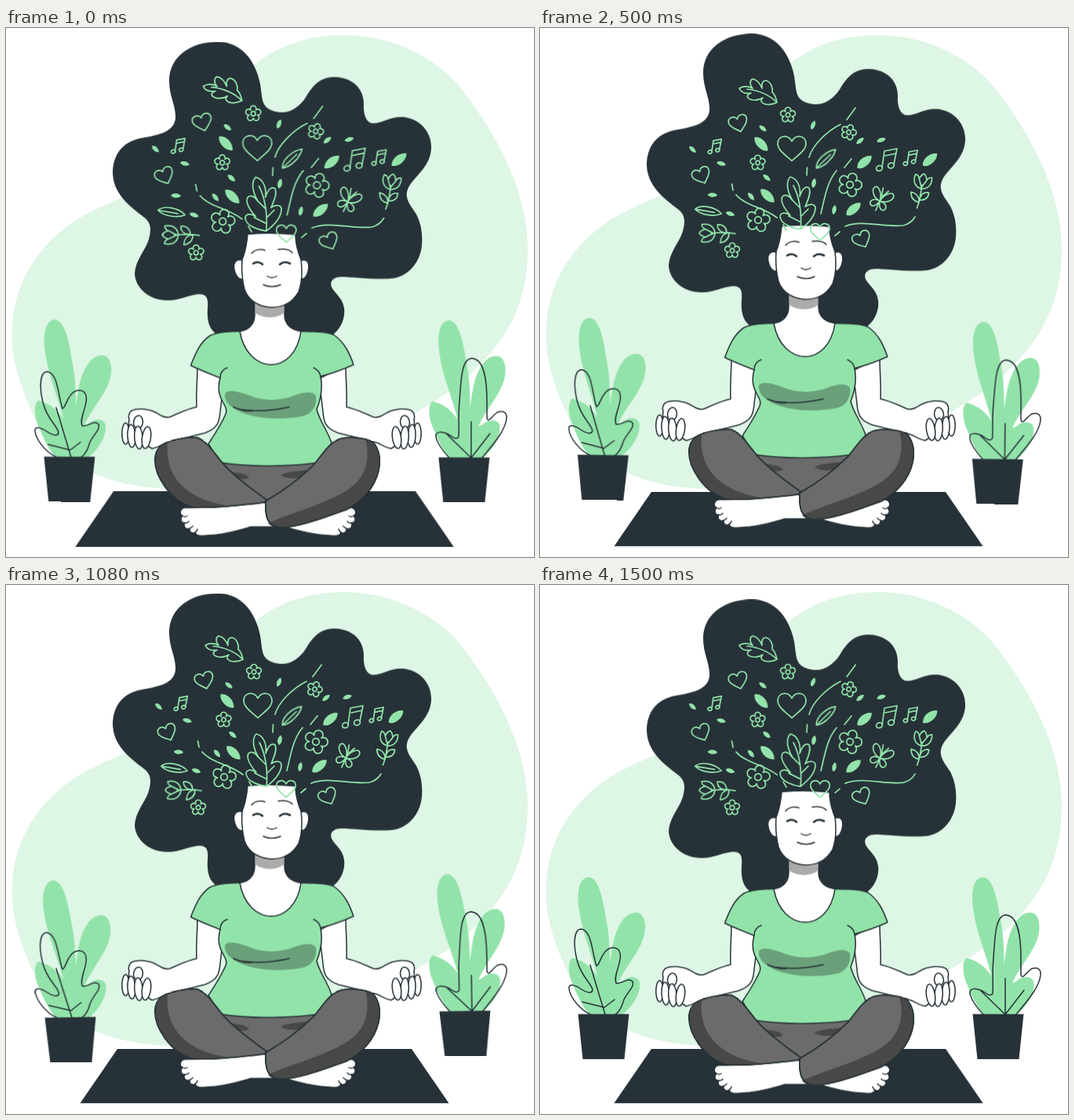
Recreate the animation shown at these times as an HTML page. Size 673 by 675 pixels, loop 1540 ms.

```html
<!DOCTYPE html>
<html lang="en">
<head>
<meta charset="utf-8">
<title>Meditation</title>
<style>
  html, body { margin: 0; width: 100%; height: 100%; overflow: hidden; background: #fff; }
  svg { display: block; width: 100vw; height: 100vh; }
  :root { --ink: #263238; --green: #92e3a9; }

  .line { fill: none; stroke: var(--ink); stroke-width: 1.5; stroke-linecap: round; stroke-linejoin: round; }
  .skin { fill: #fff; }
  .shirt { fill: var(--green); }
  .pants { fill: #6b6b6b; }
  .shade { fill: #484848; stroke: none; }
  .dark { fill: var(--ink); }
  .leafy { fill: var(--green); }
  .eyes { stroke-width: 2.6; }
  .ideas { fill: none; stroke: var(--green); stroke-width: 1.7; stroke-linecap: round; stroke-linejoin: round; }
  .drops { fill: var(--green); stroke: none; }
  .glyphs * { vector-effect: non-scaling-stroke; }

  .float, .sway, .beat { animation: 1540ms linear -40ms infinite; }
  .float { animation-name: float; animation-delay: -60ms; }
  .sway { animation-name: sway; transform-origin: 338px 488px; }
  .beat { animation-name: beat; }
  .mat { transform-origin: 329.5px 626.5px; }
  .ideas { transform-origin: 349px 178px; }

  @keyframes float { 0%, 100% { transform: translateY(.8px); } 50% { transform: translateY(-15px); } }
  @keyframes sway { 0%, 100% { transform: rotate(0deg); } 25% { transform: rotate(1deg); } 75% { transform: rotate(-1deg); } }
  @keyframes beat { 0%, 30%, 40%, 60%, 100% { transform: scale(1); } 10%, 50% { transform: scale(1.1); } }
</style>
</head>
<body>
<svg viewBox="0 0 673 675">
  <defs>
    <g id="foliage" class="leafy">
      <path d="M62 373C50 373 46 392 50 416C55 450 70 478 78 520L92 520C87 490 91 460 85 430C80 400 75 373 62 373Z"/>
      <path d="M122 418C108 418 98 435 93 458C88 485 86 510 84 530L94 522C104 488 134 465 134 437C134 425 130 418 122 418Z"/>
      <path d="M41 476C34 482 37 500 42 510C50 530 56 540 64 549H104C118 538 128 522 127 508C126 498 112 498 104 506C96 510 90 505 82 514C72 494 60 480 41 476Z"/>
    </g>
    <path id="pot" class="dark" d="M48.500 547.500H113.500L107.500 605H54.500Z"/>

    <g id="arm" class="line">
      <path class="skin" d="M244 430C244 450 242 468 243 484C232 486 218 493 208 497C197 499 192 488 180 487.500C174 486 161 486 158 491C156 494 156 497 157 500C155 510 160 525 175 530L186 537C194 536 199 531 206 529C222 524 240 521 254 517C270 511 272 503 273 490L278 448Z"/>
      <path class="skin" d="M165 497C161 503 162 510 168 511C175 511 176 501 172 496C169 494 167 495 165 497Z"/>
      <ellipse class="skin" cx="152.500" cy="518" rx="4.700" ry="13.500"/>
      <ellipse class="skin" cx="160" cy="521" rx="5" ry="14.500" transform="rotate(-3 160 521)"/>
      <ellipse class="skin" cx="169" cy="523" rx="5.200" ry="14.500" transform="rotate(-4 169 523)"/>
      <ellipse class="skin" cx="179" cy="523" rx="5.500" ry="14" transform="rotate(8 179 523)"/>
    </g>

    <g id="foot" class="line">
      <path class="skin" d="M345 637H312C298 641 280 647 256 648C249 649 242 649 241 644C238 646 233 644 234 639C230 641 225 637 228 632C223 632 221 627 225 623C220 620 222 612 230 612.500C260 613 310 610 345 600"/>
      <path d="M225 623Q228 625 231 623M228 632Q232 632 233 630M234 639Q237 638 238 636M241 644Q243 643 244 640"/>
    </g>

    <g class="glyphs">
      <g id="flower">
        <path d="M-3.400 -4.700A3.900 3.900 0 1 1 3.400 -4.700A3.900 3.900 0 1 1 5.500 1.800A3.900 3.900 0 1 1 0 5.800A3.900 3.900 0 1 1 -5.500 1.800A3.900 3.900 0 1 1 -3.400 -4.700Z"/>
        <circle r="3"/>
      </g>
      <path id="heart" d="M0 16C-6 10 -18 3 -18 -6C-18 -16 -5 -19 0 -9C5 -19 18 -16 18 -6C18 3 6 10 0 16Z"/>
      <path id="drop" d="M-12 1C-8 -6 4 -8 12 -1C8 6 -6 8 -12 1Z"/>
      <g id="note">
        <path d="M-7 10L-4 -11L12 -14L8 6M-3 -5L11 -8"/>
        <ellipse cx="-10.500" cy="11" rx="4" ry="3.300" transform="rotate(-20 -10.500 11)"/>
        <ellipse cx="4.500" cy="7.500" rx="4" ry="3.300" transform="rotate(-20 4.500 7.500)"/>
      </g>
      <path id="blade" d="M-17 0C-10 -8 8 -7 17 0C8 6 -9 6 -17 0L8 0"/>
      <g id="sprig">
        <path d="M0 25C2 14 1 4 0 -6"/>
        <path d="M0 -1C-9 -2 -13 -9 -11 -18C-8 -18 -6 -16 -5 -13C-4 -18 -2 -20 0 -21C2 -20 4 -18 5 -13C6 -16 8 -18 11 -18C13 -9 9 -2 0 -1M-5 -13L0 -3L5 -13"/>
        <path d="M1 17C-8 17 -11 12 -12 6C-6 6 0 9 1 17ZM1 14C1 6 5 2 11 2C12 8 9 13 1 14Z"/>
      </g>
      <path id="wing" d="M0 1C-2 -9 -10 -16 -13 -12C-16 -7 -10 1 0 2C-9 1 -13 7 -9 11C-5 13 -1 8 0 2"/>
    </g>
  </defs>

  <path fill="#def6e5" d="M430 9C500 9 556 44 584 82C632 146 666 215 665 286C664 350 640 395 598 436C570 464 535 483 512 497C440 540 340 590 215 588C130 588 65 555 38 500C15 452 6 418 8 383C9 330 38 279 88 246C130 220 165 214 215 180C300 120 285 75 318 46C350 20 390 9 430 9Z"/>

  <g class="sway">
    <path class="skin" d="M62 548C46 540 38 524 37 515C40 506 52 512 60 520Z"/>
    <use href="#foliage"/>
    <path class="line" d="M64 548C48 540 38 524 37 515C36 507 46 511 53 516C59 520 66 522 67 517C66 508 52 500 47 478C43 462 42 440 52 439C66 440 66 468 72 486C76 486 78 468 88 464C98 460 104 466 102 478C100 490 94 500 97 508C104 510 112 500 118 506C121 514 108 522 106 532C103 542 99 546 96 548M64 485L83 548M54 532L82 539L95 529"/>
    <use href="#pot"/>

    <path class="skin" d="M612 540C628 524 640 500 638 492L622 500Z"/>
    <use href="#foliage" x="502.500"/>
    <path class="line" d="M565 548C556 538 549 528 548 521C547 514 556 514 564 518C570 522 575 526 577 521C578 508 576 497 578 476C580 450 580 421 594 421C610 422 613 450 613 478V497C615 504 618 496 626 490C634 487 639 490 638 498C636 515 618 534 607 548M593 502V548M562 518L593 548L617 517"/>
    <use href="#pot" x="503"/>
  </g>

  <path class="dark mat beat" d="M142 592H517L564.500 661.200H94.500Z"/>

  <g class="float">
    <path class="dark" d="M270 18C300 18 318 42 324 72C327 90 325 101 340 106C358 112 372 104 382 89C391 73 402 62 420 63C442 64 456 78 456 97C455 112 460 122 468 122C480 122 490 113 506 114C528 116 543 134 542 154C541 176 524 187 514 202C506 216 514 224 523 238C530 252 531 265 530 278C528 300 512 318 492 320C470 322 440 318 428 318C418 318 412 323 415 331C418 338 429 344 431 358C433 372 425 386 416 392H270C258 385 256 372 257 358C258 345 256 340 246 340C232 341 222 348 206 348C182 348 165 332 164 314C165 296 178 284 182 270C186 256 184 248 176 242C158 228 136 212 136 184C137 158 152 145 172 141C195 137 214 133 216 116C217 100 208 88 208 68C208 38 234 18 270 18Z"/>

    <use href="#arm"/>
    <use href="#arm" transform="matrix(-1 0 0 1 677 0)"/>

    <g class="line">
      <path class="shirt" d="M298 387.500C284 388 270 388 260 393C246 402 240 420 235.500 431C247 437 261 442 273 447C270 457 271 468 276 477C280 484 282 488 280 493C274 507 266 519 258 531L276 560H398L415 530C410 514 400 503 396 487C402 472 404 460 401 445C416 441 430 436 443 430C438 416 432 402 418 392C406 387 390 388 376 387.500Z"/>
      <path d="M273 447C273 440 276 436 282 434M401 445C400 440 397 436 392 434"/>
      <path class="skin" d="M317 350V366C317 379 309 386 298 387.500C303 415 320 430 338 430C356 430 372 415 376 387.500C365 386 355 380 355 366V350Z"/>
      <path fill="#ababab" stroke="none" d="M317.500 348V364C328 371.500 345 371.500 354.500 364V348Z"/>
      <path fill="#6aa07a" stroke="none" d="M279 467C284 460 298 465 312 470C330 477 350 476 366 470C380 464 392 464 395 470C397 482 390 494 376 496C350 501 318 499 298 490C285 484 278 476 279 467Z"/>
      <path d="M290 484Q303 490 314 489M297 487C318 490 340 489 361 484"/>

      <path class="pants" d="M274 555C310 561 362 560 398 555L345 608H318Z"/>
      <path class="shade" d="M285 567C294 567 306 569 310 574C303 578 296 576 291 573ZM350 571C358 566 376 566 394 563L381 573C368 576 356 576 350 571Z"/>

      <use href="#foot"/>
      <use href="#foot" transform="matrix(-1 0 0 1 668 0)"/>

      <path class="pants" d="M198 533C210 525 232 522 244 523C260 530 268 548 282 562C300 580 318 592 333 603L328 606C300 609 266 614 238 612C210 604 188 572 190 548C191 541 194 536 198 533Z"/>
      <path class="shade" d="M206 529C202 566 222 600 280 609.500C264 612 250 613 238 612C210 604 189 572 191 548C192 540 198 532 206 529Z"/>
      <path class="pants" d="M428 524C440 522 458 523 468 529C476 538 478 552 475 565C470 588 452 606 434 615C410 623 380 636 350 638C332 637 330 622 331 604C352 592 372 578 392 558C404 544 412 528 428 524Z"/>
      <path class="shade" d="M458 524C465 552 458 574 438 588C410 607 372 616 334 632C337 636 342 638 350 637.500C380 635 410 623 434 614.500C452 606 470 588 474.500 565C477 550 475 530 458 524Z"/>
      <path d="M198 533C210 525 232 522 244 523C260 530 268 548 282 562C300 580 318 592 333 603M198 533C194 536 191 541 190 548C188 572 210 604 238 612C266 614 300 609 331 606M331 604C352 592 372 578 392 558C404 544 412 528 428 524C440 522 458 523 468 529C476 538 478 552 475 565C470 588 452 606 434 615C410 623 380 636 350 638C332 637 330 622 331 604"/>

      <path class="skin" d="M302 297C293 294 289 301 291 309C293 318 298 323 304 320ZM376 297C386 294 387 303 385 311C383 319 379 322 374 320Z"/>
      <path class="skin" d="M308 263.500Q338 261 369 264C369 276 372 286 376 296C378 312 377 326 373 337C365 351 352 357 338 357C322 356 309 348 304 334C301 322 300 310 301 296C305 286 307 275 308 263.500Z"/>
      <path d="M313 288C317 283 324 282 330 284M347 283C354 282 361 283 365 287M333 317Q339 321 345 317M328 328Q339 333 350 328"/>
      <path class="eyes" d="M315 301Q321 297 327 302M349 302Q355 297 362 301"/>
    </g>
  </g>

  <g class="ideas beat">
    <path d="M302 95C296 98 287 99 283 95C281 93 282 91 284 89C278 93 269 93 265 89C263 86 266 84 269 83C262 84 256 82 254 77C259 74 265 74 271 77C267 73 267 67 271 65C277 66 281 72 283 77C282 71 284 67 288 67C295 69 297 77 296 82C300 85 301 90 302 95C293 86 282 80 264 78"/>
    <path d="M332 257C324 256 307 251 306 241C306 236 312 234 319 239C312 231 306 221 309 215C313 211 319 215 322 220C315 209 313 196 319 190C328 192 333 203 331 215C334 206 338 201 343 204C346 211 341 221 338 228C343 224 350 224 351 229C351 241 340 251 332 257C334 238 331 216 323 201M331 247L317 240M333 240L342 231M331 229L320 218"/>

    <use href="#flower" transform="translate(316 111) scale(.93)"/>
    <use href="#flower" transform="translate(277.500 172) scale(.93)"/>
    <use href="#flower" transform="translate(278 245) scale(1.450) rotate(12)"/>
    <use href="#flower" transform="translate(245 284) scale(.93)"/>
    <use href="#flower" transform="translate(393.500 133) scale(.93) rotate(20)"/>
    <use href="#flower" transform="translate(395 200) scale(1.450) rotate(20)"/>

    <use href="#heart" transform="translate(321 153.500)"/>
    <use href="#heart" transform="translate(253 122) rotate(-16) scale(.66)"/>
    <use href="#heart" transform="translate(206 188.500) rotate(-24) scale(.64)"/>
    <use href="#heart" transform="translate(410.500 270) rotate(-26) scale(.64)"/>
    <use href="#heart" transform="translate(357 260) scale(.68)"/>

    <use href="#note" transform="translate(443 168)"/>
    <use href="#note" transform="translate(473 165.500) scale(.68)"/>
    <use href="#note" transform="translate(223.500 151) scale(.65)"/>

    <use href="#blade" transform="translate(214.500 234) rotate(10)"/>
    <use href="#blade" transform="translate(364.500 167) rotate(-44)"/>
    <use href="#sprig" transform="translate(224 262) rotate(-89)"/>
    <use href="#sprig" transform="translate(485.500 206) rotate(12) scale(.97)"/>

    <g transform="translate(434 219) rotate(24)">
      <use href="#wing"/>
      <use href="#wing" transform="scale(-1 1)"/>
      <path d="M0 -3V15M0 -3L-3 -15M0 -3L5 -14"/>
    </g>

    <path d="M244.500 199L246 207M250 213C262 227 286 229 302 242M310 251L314 258M340 188L340.500 178M343 165C347 150 365 132 383 123M391 117L402 102M358 237C363 216 366 196 378 182M388 178L397 167M376 265L382 260M389 253C410 244 440 255 463 252C471 250 475 246 478 241"/>

    <g class="drops">
      <use href="#drop" transform="translate(282 148) rotate(50)"/>
      <use href="#drop" transform="translate(290 214) rotate(48)"/>
      <use href="#drop" transform="translate(399.500 231) rotate(-36)"/>
      <use href="#drop" transform="translate(413.500 171) rotate(-36)"/>
      <use href="#drop" transform="translate(497 168) rotate(-36)"/>
      <use href="#drop" transform="translate(284 128) rotate(42) scale(.48)"/>
      <use href="#drop" transform="translate(194.500 155) rotate(48) scale(.48)"/>
      <use href="#drop" transform="translate(231 173) rotate(18) scale(.5)"/>
      <use href="#drop" transform="translate(289 191) rotate(45) scale(.5)"/>
      <use href="#drop" transform="translate(269 215) rotate(55) scale(.5)"/>
      <use href="#drop" transform="translate(220 213) rotate(8) scale(.52)"/>
      <use href="#drop" transform="translate(242.500 237) rotate(22) scale(.5)"/>
      <use href="#drop" transform="translate(348 124) rotate(-65) scale(.5)"/>
      <use href="#drop" transform="translate(349 198) rotate(-75) scale(.52)"/>
      <use href="#drop" transform="translate(375 232) rotate(-75) scale(.5)"/>
      <use href="#drop" transform="translate(408 144) rotate(-36) scale(.5)"/>
      <use href="#drop" transform="translate(435 143) rotate(-14) scale(.5)"/>
    </g>
  </g>
</svg>
</body>
</html>
```
